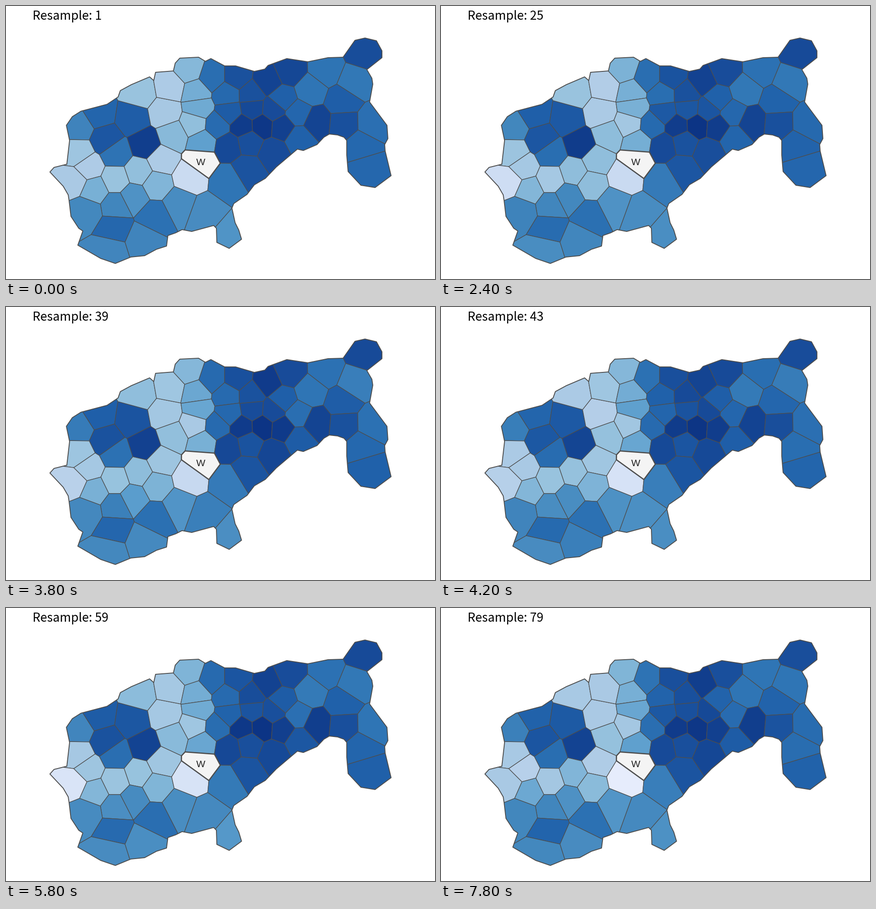
Recreate the animation shown at these times as a matplotlib script. Size 938x597 px, loop 8000 ms.

```python
import numpy as np
import matplotlib.pyplot as plt
from matplotlib.animation import FuncAnimation
from matplotlib.collections import PolyCollection
from matplotlib.colors import LinearSegmentedColormap
from matplotlib.patches import Polygon

W, H, DPI = 938, 597, 100
PX = 72 / DPI
STEP = 100
LAST = 79
LINE = "#4d4d4d"
BLUES = LinearSegmentedColormap.from_list("blues", [
    "#e6ecfc", "#ccdcf2", "#aecbe6", "#98c3de", "#7cb2d6", "#5a9dcd",
    "#468abf", "#2f75b5", "#2061aa", "#174a98", "#0b3182"])

# towns: x, y, mean level in percent
WEST = [
    (159, 264, 65), (203, 236, 80), (276, 247, 83), (219, 291, 85),
    (241, 322, 73), (304, 302, 93), (158, 321, 28), (349, 233, 23),
    (366, 281, 31), (150, 383, 16), (180, 353, 21), (193, 402, 40),
    (240, 379, 27), (290, 362, 33), (340, 337, 27), (329, 390, 36),
    (401, 374, 7), (292, 188, 28), (360, 176, 24), (400, 139, 37),
    (416, 188, 44), (421, 223, 45), (411, 257, 28), (430, 297, 44)]
CENTRE = [
    (451, 156, 72), (484, 193, 75), (489, 233, 81), (462, 261, 75),
    (505, 156, 87), (536, 192, 88), (572, 164, 93), (539, 225, 87),
    (584, 228, 88), (517, 262, 96), (560, 261, 98), (604, 264, 95),
    (487, 306, 90), (532, 297, 87), (584, 319, 91), (527, 357, 85),
    (641, 289, 81), (638, 235, 75), (605, 203, 80), (620, 142, 89)]
EAST = [
    (783, 100, 89), (699, 140, 71), (762, 166, 68), (665, 184, 68),
    (735, 208, 80), (679, 254, 94), (738, 259, 87), (801, 258, 73),
    (777, 304, 77), (793, 357, 78)]
SOUTH = [
    (486, 382, 66), (436, 453, 60), (491, 501, 57), (378, 432, 57),
    (325, 459, 72), (279, 417, 56), (240, 437, 60), (176, 448, 60),
    (237, 485, 76), (226, 535, 60), (299, 512, 62)]
FOCUS = (427, 338)

NORTH_COAST = [
    (96, 363), (105, 353), (133, 346), (139, 294), (132, 261), (145, 242),
    (164, 230), (221, 215), (245, 199), (250, 185), (274, 172), (314, 155),
    (323, 163), (327, 145), (366, 142), (370, 125), (380, 114), (421, 112),
    (436, 121), (448, 115), (478, 131), (502, 131), (543, 143), (566, 138),
    (573, 130), (614, 115), (660, 122), (704, 113), (737, 112), (763, 75),
    (785, 70), (810, 76), (822, 98), (822, 113), (789, 139), (800, 158),
    (802, 171), (795, 210), (833, 261), (835, 290), (828, 303)]
SOUTH_COAST = [
    (829, 317), (842, 371), (807, 397), (776, 392), (748, 362), (745, 326),
    (745, 294), (739, 287), (725, 282), (707, 280), (695, 287), (680, 303),
    (650, 316), (637, 313), (591, 352), (567, 377), (543, 391), (527, 412),
    (498, 432), (494, 442), (501, 474), (509, 490), (515, 510), (488, 530),
    (461, 517), (460, 486), (454, 480), (406, 493), (385, 489), (371, 496),
    (354, 502), (351, 525), (329, 532), (303, 546), (273, 549), (239, 563),
    (207, 552), (157, 523), (168, 492), (159, 486), (142, 460), (138, 426),
    (136, 413), (125, 394)]


def cut(poly, mid, normal):
    """Part of a convex polygon on the near side of a line."""
    kept = []
    for p, q in zip(poly, poly[1:] + poly[:1]):
        dp, dq = np.dot(p - mid, normal), np.dot(q - mid, normal)
        if dp <= 0:
            kept.append(p)
        if dp * dq < 0:
            kept.append(p + (q - p) * dp / (dp - dq))
    return kept


def voronoi(sites):
    """Voronoi cell of every site, bounded by the stage."""
    stage = [np.array(c, float) for c in ((0, 0), (W, 0), (W, H), (0, H))]
    cells = []
    for i, a in enumerate(sites):
        poly = stage
        for j, b in enumerate(sites):
            if i != j:
                poly = cut(poly, (a + b) / 2, b - a)
        cells.append(np.array(poly))
    return cells


def resampled(means):
    """One row of levels per resample; paler cells scatter more."""
    rng = np.random.RandomState(7)
    spread = 0.01 + 0.035 * (1 - means)
    noise = rng.randn(LAST + 1, len(means))
    return np.clip(means + spread * noise, 0, 1)


towns = np.array(WEST + CENTRE + EAST + SOUTH, float)
*regions, focus = voronoi(np.vstack([towns[:, :2], FOCUS]))
colours = BLUES(resampled(towns[:, 2] / 100))

fig = plt.figure(figsize=(W / DPI, H / DPI), dpi=DPI, facecolor="white")
ax = fig.add_axes([0, 0, 1, 1])
ax.set(xlim=(0, W), ylim=(H, 0))
ax.axis("off")

coast = Polygon(NORTH_COAST + SOUTH_COAST, fill=False, edgecolor=LINE,
                linewidth=1.9 * PX, joinstyle="round", zorder=3)
ax.add_patch(coast)
cells = PolyCollection(regions, edgecolors=LINE, linewidths=1.3 * PX,
                       joinstyle="round", zorder=2)
ax.add_collection(cells)
cells.set_clip_path(coast)
ax.add_patch(Polygon(focus, facecolor="#f4f4f4", edgecolor=LINE,
                     linewidth=2.6 * PX, joinstyle="round", zorder=4))
ax.text(426, 348.5, "W", family="Liberation Sans", size=21 * PX,
        color="#222222", ha="center", va="baseline", zorder=5)
title = ax.text(57.5, 30, "", family="Noto Sans CJK JP", size=26.7 * PX,
                color="black", ha="left", va="baseline")


def draw(k):
    n = min(k + 1, LAST)
    cells.set_facecolor(colours[n])
    title.set_text(f"Resample: {n}")
    return cells, title


anim = FuncAnimation(fig, draw, frames=8000 // STEP, interval=STEP,
                     repeat=True, repeat_delay=0)
plt.show()
```
